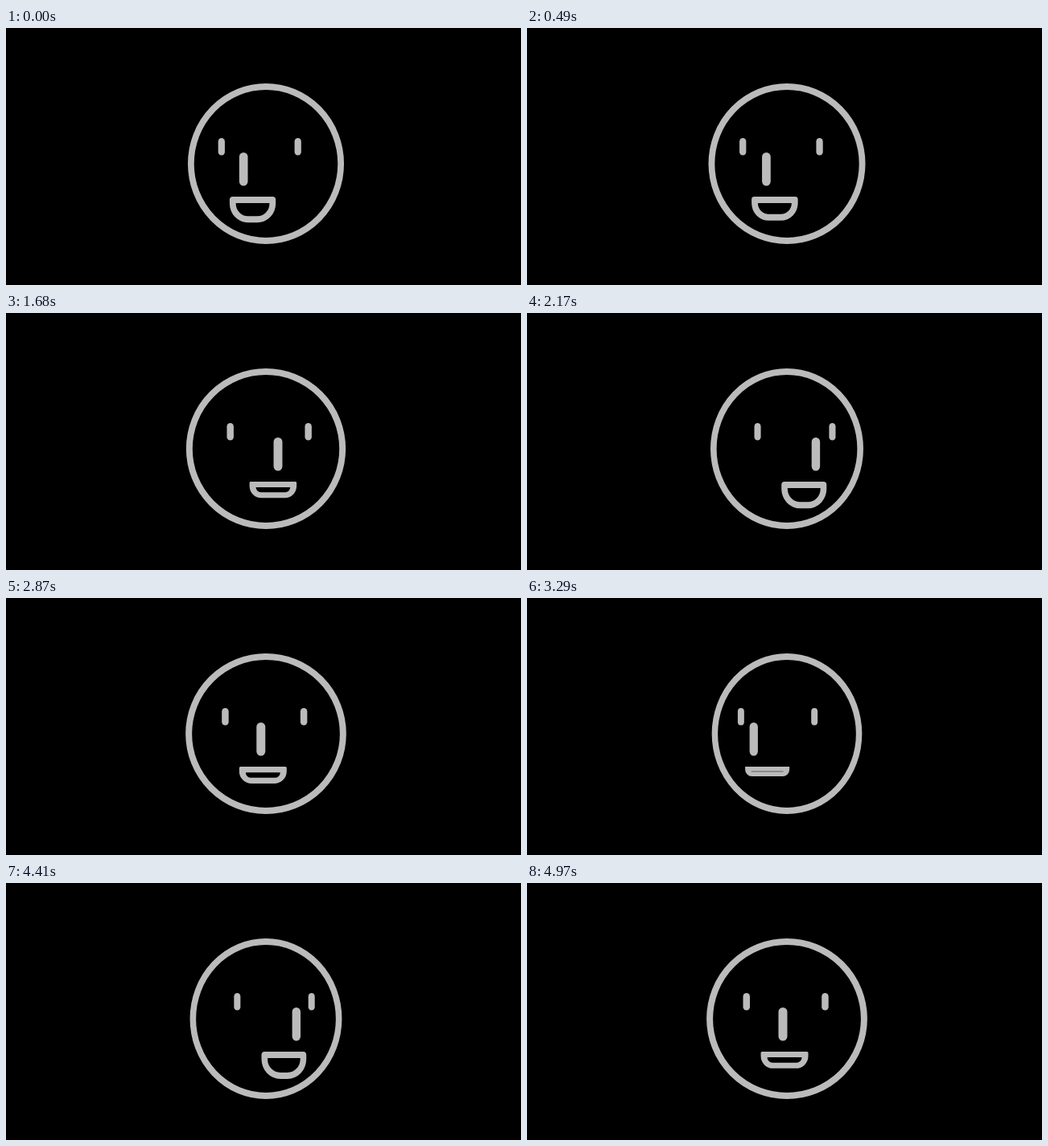
These frames come from a looping animation (640 px wide and 320 px high, 5.04 s). An HTML page with a canvas:

```html
<!DOCTYPE html>
<html lang="en">
<head>
<meta charset="utf-8">
<title>Turning face</title>
<style>
  html, body { margin: 0; width: 100%; height: 100%; overflow: hidden; background: #000; }
  canvas { display: block; }
</style>
</head>
<body>
<canvas id="stage" width="640" height="320"></canvas>
<script>
const ctx = document.getElementById('stage').getContext('2d');
const LOOP = 5040, STEP = 70, COLOR = '#bbb';

// Head turn over time: [ms, degrees]
const turns = [
  [0, -14], [210, -20.5], [560, -11], [1050, -3.2], [1680, 7.5], [2170, 18.2], [2330, 19.5],
  [2870, -3.1], [3260, -21], [3640, -7.8], [4250, 20], [4410, 19.2], [4970, -2.5]
];

function slope(i) {
  const [t0, a0] = turns[Math.max(i - 1, 0)];
  const [t1, a1] = turns[Math.min(i + 1, turns.length - 1)];
  return (a1 - a0) / (t1 - t0);
}

// Smooth Hermite curve through the turns, in radians
function headAngle(t) {
  let i = 0;
  while (i < turns.length - 2 && t >= turns[i + 1][0]) i++;
  const [t0, a0] = turns[i], [t1, a1] = turns[i + 1];
  const d = t1 - t0, u = (t - t0) / d, v = 1 - u;
  const deg = a0 * v * v * (1 + 2 * u) + a1 * u * u * (3 - 2 * u)
            + d * u * v * (slope(i) * v - slope(i + 1) * u);
  return deg * Math.PI / 180;
}

function mouthHeight(t) {
  return 23 + 11 * Math.cos(2 * Math.PI * (t - 190) / 2095);
}

function bar(x, y, w, h) {
  ctx.beginPath();
  ctx.roundRect(x - w / 2, y, w, h, w / 2);
  ctx.fill();
}

function mouth(x, y, h) {
  const half = 29.5, side = 8;
  const lip = Math.min(8, 4 + 0.15 * h), gap = h - 2 * lip;
  const top = Math.max(0, (h - 13) / 5), round = 0.73 * h;
  const inner = Math.min(round - lip, gap);
  ctx.beginPath();
  ctx.roundRect(x - half, y, 2 * half, h, [top, top, round, round]);
  ctx.roundRect(x - half + side, y + lip, 2 * (half - side), gap, [0, 0, inner, inner]);
  ctx.fill('evenodd');
}

function draw(t) {
  const angle = headAngle(t), shift = Math.tan(angle);
  ctx.setTransform(1, 0, 0, 1, 0, 0);
  ctx.fillStyle = '#000';
  ctx.fillRect(0, 0, 640, 320);
  ctx.translate(323, 169);
  ctx.scale(Math.cos(angle), 1);
  ctx.fillStyle = ctx.strokeStyle = COLOR;
  ctx.lineWidth = 8;
  ctx.beginPath();
  ctx.arc(0, 0, 96, 0, 2 * Math.PI);
  ctx.stroke();
  // Features nearer the viewer shift further as the head turns
  for (const x of [-48.9, 48.9]) bar(x + 32 * shift, -32, 8.5, 21.5);
  bar(115 * shift, -14, 11, 41.5);
  mouth(68 * shift, 41, mouthHeight(t));
}

function tick() {
  const t = performance.now() % LOOP;
  draw(Math.floor(t / STEP) * STEP);
  requestAnimationFrame(tick);
}
tick();
</script>
</body>
</html>
```
